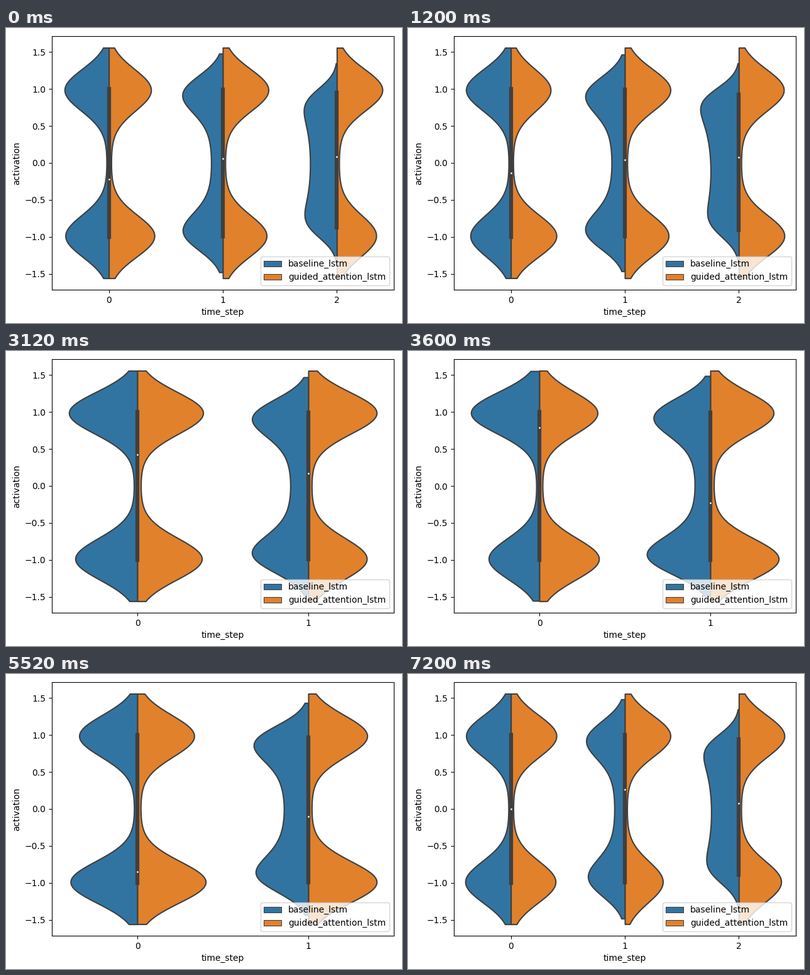
Write a matplotlib script that moves like this. It is 630 by 470 pixels and loops after 8000 ms.

```python
import numpy as np
import matplotlib.pyplot as plt
from matplotlib.animation import FuncAnimation

W, H, DPI = 630, 470, 100
LEFT, RIGHT, TOP, BOTTOM = 73, 617, 13, 417     # axes box in pixels
BLUE, ORANGE, GRAY = "#3274a1", "#e1812c", "#3f3f3f"
LW = 1.5
MAX_WIDTH = 0.4
SAMPLES = 500
SATURATED, WEAK = 13, 0.95      # gains: hard two-state units, nearly linear units
INTERVAL, HOLD = 400, 3         # ms per frame, frames per scene

# Baseline gain at step 1, then per step the skew (in percent, positive is up)
# of the baseline and the guided model.
SCENES = [
    (2.4, [(1, -3.6), (0.5, 2), (1, 7)]),
    (2.1, [(4.9, -6.4), (0, 2), (8, -0.5)]),
    (2.2, [(4.7, 1), (0, 7.5)]),
    (2.65, [(14.3, -1.1), (-4.5, -3.6)]),
    (1.6, [(-6.5, -8.7), (1.5, -7)]),
    (1.55, [(-1.5, 2), (0, 2)]),
    (2.5, [(-0.8, 1), (2, 8.7), (3.4, 3.6)]),
]


def normal_quantiles(n):
    z = np.linspace(-4, 4, 4001)
    cdf = np.cumsum(np.exp(-z**2 / 2))
    return np.interp((np.arange(n) + 0.5) / n, cdf / cdf[-1], z)


NORMAL = normal_quantiles(SAMPLES)


def activations(gain, skew):
    """Squashed normal inputs, shifted so that `skew` percent more are positive."""
    shift = skew / 200 * np.sqrt(2 * np.pi)
    return np.tanh(gain * (NORMAL + shift))


def density(data):
    """Gaussian kernel density with Scott's bandwidth, cut two bandwidths out."""
    bw = data.std(ddof=1) * len(data) ** -0.2
    grid = np.linspace(data.min() - 2 * bw, data.max() + 2 * bw, 100)
    kernels = np.exp(-((grid[:, None] - data) / bw) ** 2 / 2)
    return grid, kernels.mean(axis=1) / (bw * np.sqrt(2 * np.pi))


def draw_violin(x, baseline, guided):
    """Draw one split violin and return its lowest and highest value."""
    halves = [density(baseline), density(guided)]
    peak = max(d.max() for _, d in halves)
    for (grid, d), side, color in zip(halves, (-1, 1), (BLUE, ORANGE)):
        ax.fill_betweenx(grid, x, x + side * d / peak * MAX_WIDTH,
                         facecolor=color, edgecolor=GRAY, linewidth=LW)
    q1, median, q3 = np.percentile(np.concatenate([baseline, guided]), [25, 50, 75])
    ax.plot([x, x], [q1, q3], color=GRAY, linewidth=3 * LW)
    ax.scatter(x, median, s=(2 * LW) ** 2, color="white", edgecolor=GRAY, zorder=3)
    return min(g[0] for g, _ in halves), max(g[-1] for g, _ in halves)


def draw_legend():
    keys = [plt.Rectangle((0, 0), 0, 0, facecolor=c, edgecolor=GRAY, linewidth=LW / 2)
            for c in (BLUE, ORANGE)]
    ax.legend(keys, ["baseline_lstm", "guided_attention_lstm"], loc="lower right")


def update(i):
    gain, skews = SCENES[i // HOLD]
    ax.clear()
    spans = []
    for x, (base_skew, guided_skew) in enumerate(skews):
        baseline = activations((SATURATED, gain, WEAK)[x], base_skew)
        guided = activations(SATURATED, guided_skew)
        spans.append(draw_violin(x, baseline, guided))
    low, high = np.min(spans), np.max(spans)
    margin = 0.05 * (high - low)
    ax.set_ylim(low - margin, high + margin)
    ax.set_yticks(np.arange(-1.5, 1.6, 0.5))
    ax.set_xlim(-0.5, len(skews) - 0.5)
    ax.set_xticks(range(len(skews)))
    ax.set_xlabel("time_step")
    ax.set_ylabel("activation")
    draw_legend()
    return []


plt.rcParams["font.family"] = "DejaVu Sans"
fig = plt.figure(figsize=(W / DPI, H / DPI), dpi=DPI, facecolor="white")
ax = fig.add_axes([LEFT / W, 1 - BOTTOM / H, (RIGHT - LEFT) / W, (BOTTOM - TOP) / H])
anim = FuncAnimation(fig, update, frames=20, init_func=lambda: [],
                     interval=INTERVAL, repeat=True, repeat_delay=0, blit=False)
plt.show()
```
